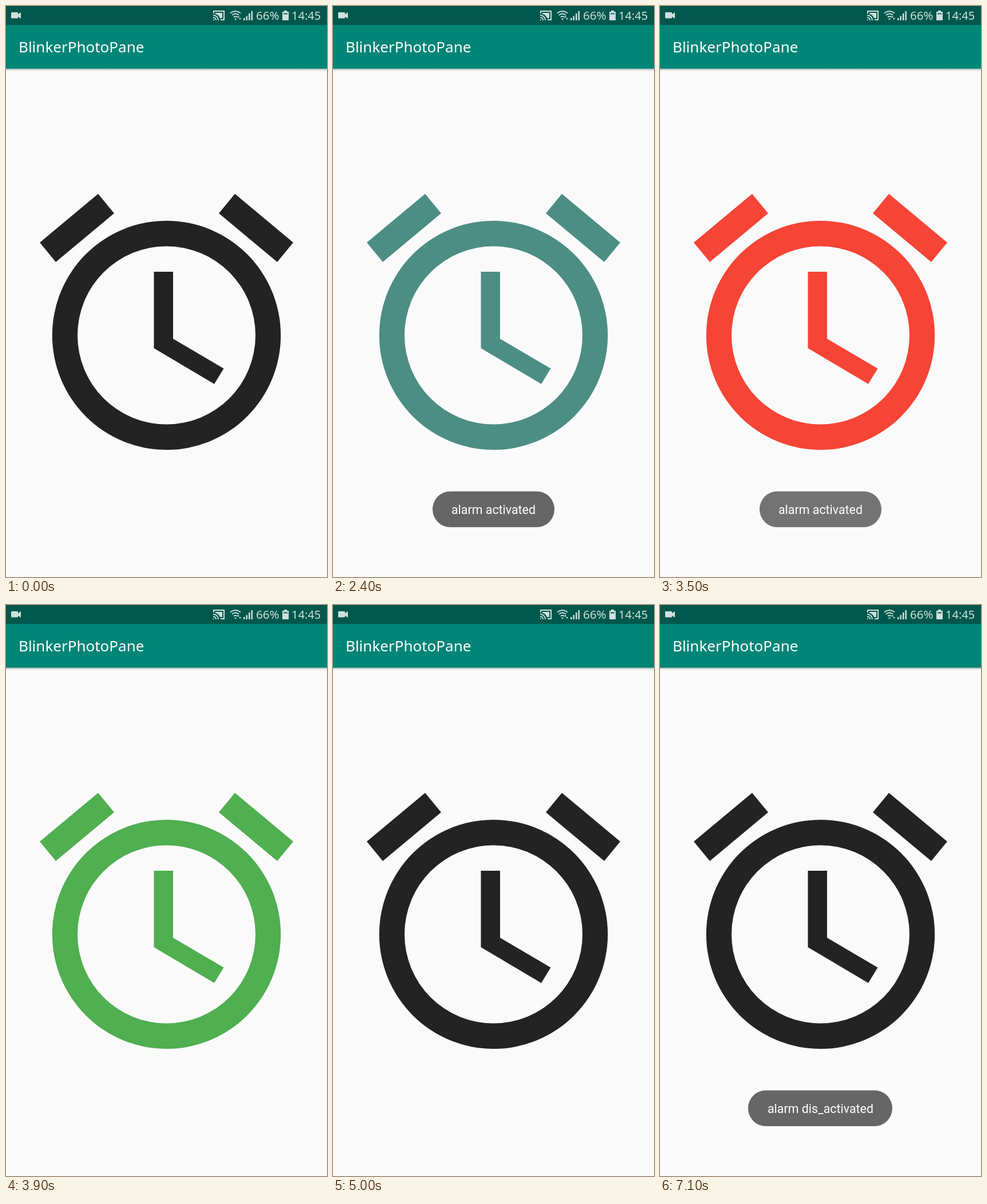
Recreate the animation shown at these times as an HTML page. Size 561 by 997 pixels, loop 7.2 s.

```html
<!DOCTYPE html>
<html lang="en">
<head>
<meta charset="utf-8">
<title>Alarm flasher</title>
<style>
  html, body { margin: 0; width: 100%; height: 100%; overflow: hidden; background: #fafafa; }
  svg { display: block; width: 100%; height: 100%; }
  .ui { font-family: "Noto Sans", sans-serif; }
  .toast text { font: 21.4px Roboto, sans-serif; fill: #fff; text-anchor: middle; }
  .toast rect { fill: #666; }
</style>
</head>
<body>
<svg viewBox="0 0 561 997">
  <defs>
    <linearGradient id="shade" x2="0" y2="1">
      <stop stop-color="#b8bcbc"/>
      <stop offset="1" stop-color="#fafafa"/>
    </linearGradient>
  </defs>
  <rect width="561" height="997" fill="#fafafa"/>
  <rect y="109" width="561" height="5" fill="url(#shade)"/>
  <rect y="33" width="561" height="76.5" fill="#008577"/>
  <rect width="561" height="33" fill="#00574b"/>

  <g class="ui" fill="#cfe0dc" font-size="20">
    <!-- camera -->
    <path d="M10 11h10q1 0 1 1v2.500l5-3.500v11l-5-3.500v2q0 1-1 1h-10q-1 0-1-1v-8.500q0-1 1-1z"/>
    <!-- cast -->
    <g fill="none" stroke="#cfe0dc" stroke-width="2">
      <path d="M363 13v-4h18v15h-6M362 16a9 9 0 0 1 9 9M362 20a5 5 0 0 1 5 5"/>
    </g>
    <path d="M366 12h12v9h-4q-2-6-8-7zM362 23a2 2 0 0 1 2 2h-2z"/>
    <!-- wifi -->
    <g fill="none" stroke="#cfe0dc" stroke-width="1.800">
      <path d="M392 12.500q9-7 18 0M395 16q6-5 12 0M398 19.500q3-2.500 6 0"/>
    </g>
    <path d="M399 22h4l-2 3zM404 20l2-3 2 3zM407 21h4l-2 3z"/>
    <!-- signal -->
    <path d="M415 21h2.500v4h-2.500zM419.500 17.500h2.500v7.500h-2.500zM424 13h2.500v12h-2.500zM428.500 9h2.500v16h-2.500z"/>
    <text x="437" y="24" font-size="20.500">66%</text>
    <!-- battery -->
    <path d="M486 8h5v2h3v15h-11v-15h3z"/>
    <path d="M485 12h7v3h-7z" fill="#4e8c83"/>
    <text x="499" y="24">14:45</text>
  </g>
  <text class="ui" x="22" y="81" font-size="26" fill="#fff">BlinkerPhotoPane</text>

  <g id="clock">
    <path fill-rule="evenodd" d="M80.800 575a199.700 200 0 0 1 399.400 0a199.700 200 0 0 1-399.400 0z
      M125 575a155.500 155.500 0 0 0 311 0a155.500 155.500 0 0 0-311 0z"/>
    <path d="M161 328l28 34-102 85-28-34zM400 328l102 85-28 34-102-85z
      M258.500 464H292V581L380.500 633 364 660 258.500 597.500z"/>
  </g>

  <g class="toast" id="on">
    <rect x="174" y="847.500" width="213" height="62.500" rx="31"/>
    <text x="280.500" y="887">alarm activated</text>
  </g>
  <g class="toast" id="off">
    <rect x="154" y="847.500" width="252" height="62.500" rx="31"/>
    <text x="280.500" y="887">alarm dis_activated</text>
  </g>
</svg>
<script>
const LOOP = 7200, STEP = 100;
const START = 1075, STOP = 4700, BLINK = 330, FADE = 500;
const DARK = "#232323", RED = "#f64436", GREEN = "#50af50", TEAL = "#4d8e84";
const $ = id => document.getElementById(id);
const clamp = x => Math.min(1, Math.max(0, x));

function clockColor(t) {
  if (t < START || t >= STOP) return DARK;
  const age = t - START;
  if (Math.floor(age / BLINK) % 2) return RED;
  return age % BLINK < STEP ? TEAL : GREEN;
}

// Decelerating fade in, accelerating fade out
function toastAlpha(t, show, hide) {
  const enter = 1 - (1 - clamp((t - show) / FADE)) ** 2;
  return enter * (1 - clamp((t - hide) / FADE) ** 2);
}

function draw(now) {
  const t = Math.floor(now % LOOP / STEP) * STEP;
  $("clock").setAttribute("fill", clockColor(t));
  $("on").setAttribute("opacity", toastAlpha(t, 1310, 3350));
  $("off").setAttribute("opacity", toastAlpha(t, 5300, LOOP));
}

let began;
function tick(now) {
  began ??= now;
  draw(now - began);
  requestAnimationFrame(tick);
}
draw(0);
requestAnimationFrame(tick);
</script>
</body>
</html>
```
